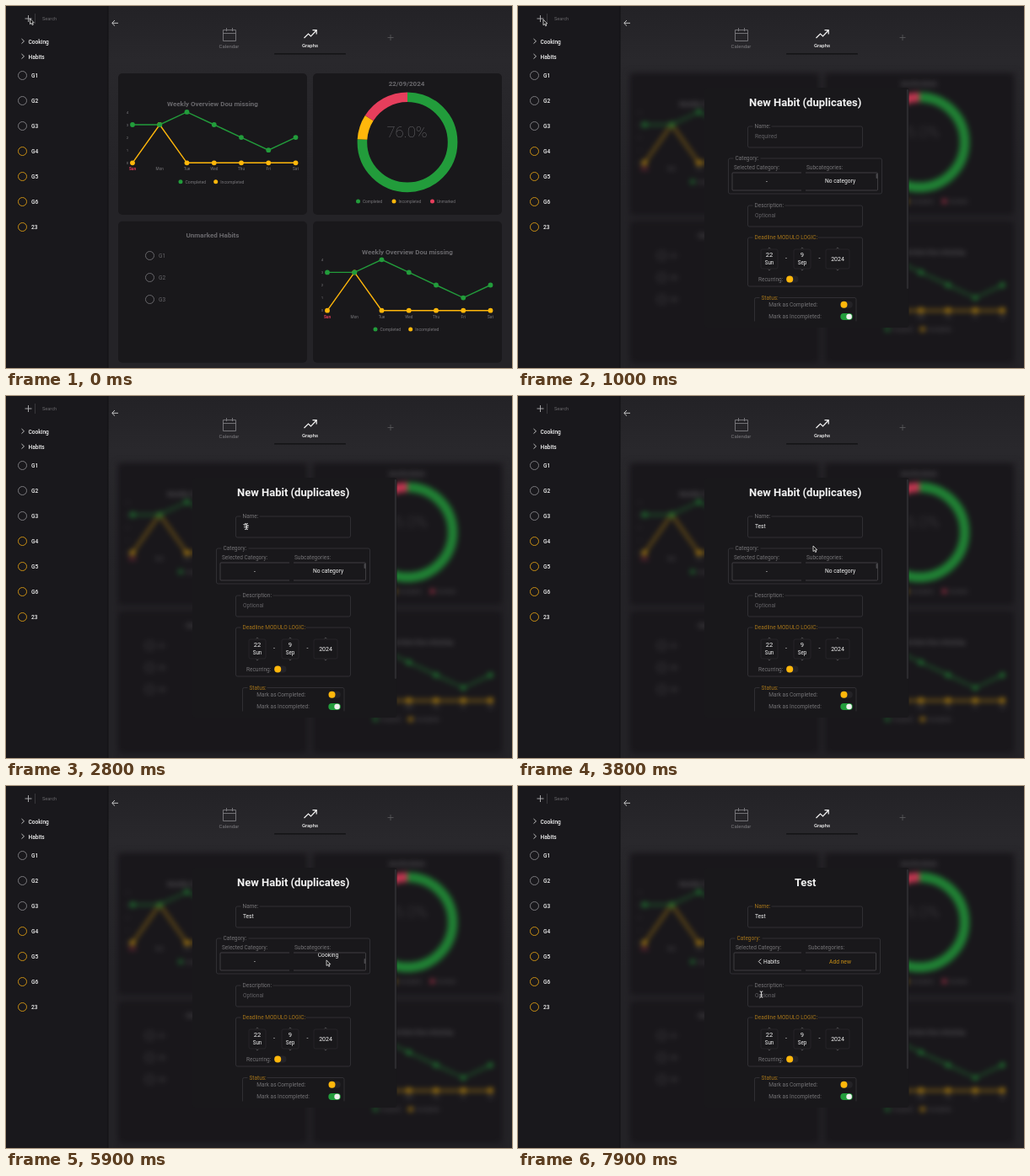
An HTML page for the animation above (8 s loop, 600 px wide and 430 px high).

```html
<!DOCTYPE html>
<html lang="en">
<head>
<meta charset="utf-8">
<title>Habit tracker</title>
<style>
html, body { margin: 0; width: 100%; height: 100%; overflow: hidden; background: #242327; }
svg { display: block; width: 600px; height: 430px; font-family: Roboto, "Open Sans", sans-serif; }
</style>
</head>
<body>
<svg id="stage" viewBox="0 0 600 430" xmlns="http://www.w3.org/2000/svg"></svg>
<script>
const LOOP = 8000;
const GREEN = '#229c3b', YELLOW = '#ffb70b', RED = '#e63e5c';
const PANEL = '#19181b', GOLD = '#a5741a', GREY = '#747376', LINE = '#343337', WHITE = '#f2f2f2';

const text = (x, y, s, size, fill, extra = '') =>
  `<text x="${x}" y="${y}" font-size="${size}" fill="${fill}" ${extra}>${s}</text>`;
const mid = (x, y, s, size, fill, extra = '') => text(x, y, s, size, fill, 'text-anchor="middle" ' + extra);
const rect = (x, y, w, h, fill, extra = '') =>
  `<rect x="${x}" y="${y}" width="${w}" height="${h}" fill="${fill}" ${extra}/>`;
const path = (d, stroke, width = 1, extra = '') =>
  `<path d="${d}" fill="none" stroke="${stroke}" stroke-width="${width}" ${extra}/>`;
const dot = (x, y, r, fill, extra = '') => `<circle cx="${x}" cy="${y}" r="${r}" fill="${fill}" ${extra}/>`;
const BOLD = 'font-weight="700"', MEDIUM = 'font-weight="500"';

function sidebar() {
  let s = rect(0, 0, 121, 430, '#19181c') + rect(120.5, 0, 1, 430, '#101012');
  s += path('M22.5 15H30.5M26.5 11V19', '#b4b4b6', .9);
  s += path('M34.5 9V21', '#38373b', 1) + text(43, 17.2, 'Search', 5.6, '#68676b');
  ['Cooking', 'Habits'].forEach((name, i) => {
    const y = 42 + i * 18;
    s += path(`M18.5 ${y - 3}l3 2.8l-3 2.8`, '#d0d0d0', .9) + text(26.5, y + 2.6, name, 6.6, WHITE, MEDIUM);
  });
  ['G1', 'G2', 'G3', 'G4', 'G5', 'G6', '23'].forEach((name, i) => {
    const y = 82.5 + i * 30;
    s += dot(19.5, y, 5, 'none', `stroke="${i < 3 ? '#7b7a7e' : '#c98f14'}" stroke-width="1"`);
    s += text(30, y + 2, name, 6.6, WHITE, MEDIUM);
  });
  return s;
}

function header() {
  return path('M133 20.3H126M129 17l-3.3 3.3l3.3 3.3', '#d5d5d5', .9) +
    path('M257.5 28.5h15v13h-15zM257.5 32.5h15M261.5 26v4M268.5 26v4', '#7c7b7f', .9) +
    mid(264.5, 49.8, 'Calendar', 6, '#7c7b7f') +
    path('M353.5 38l5-5l3 3l6.5-7M363.5 28.7h4.7v4.7', WHITE, 1.2) +
    mid(360.5, 48.8, 'Graphs', 6, WHITE, MEDIUM) +
    rect(318, 56.3, 85, 1.2, '#0f0f11', 'rx=".6"') +
    path('M452.5 37.5h7M456 34v7', '#5c5b5f', .8);
}

const legend = (x, y, name, fill, size) =>
  dot(x, y, 2.5, fill) + text(x + 5.5, y + 1.8, name, size, '#77767a');

function chart(dx, dy) {
  const px = i => 150 + i * 32.25, py = v => 186.3 - v * 15.1;
  const series = (values, fill) =>
    path('M' + values.map((v, i) => px(i) + ' ' + py(v)).join('L'), fill, 1.4) +
    values.map((v, i) => dot(px(i), py(v), 2.9, fill)).join('');
  let s = mid(245, 119.3, 'Weekly Overview Dou missing', 8, '#69686c', BOLD);
  for (let v = 0; v < 5; v++) s += mid(144, py(v) + 1.6, v, 4.4, '#77767a');
  ['Sun', 'Mon', 'Tue', 'Wed', 'Thu', 'Fri', 'Sat'].forEach((day, i) => {
    s += mid(px(i), 195.3, day, 4.7, i ? '#77767a' : RED, i ? '' : BOLD);
  });
  s += series([0, 3, 0, 0, 0, 0, 0], YELLOW) + series([3, 3, 4, 3, 2, 1, 2], GREEN);
  s += legend(207, 208.7, 'Completed', GREEN, 5.1) + legend(248.7, 208.7, 'Incompleted', YELLOW, 5.1);
  return `<g transform="translate(${dx} ${dy})">${s}</g>`;
}

function donut() {
  const arc = (from, share, fill) =>
    dot(476, 161.8, 53.6, 'none', `stroke="${fill}" stroke-width="11.6" pathLength="100"
      stroke-dasharray="${share} ${100 - share}" stroke-dashoffset="${-from}" transform="rotate(-90 476 161.8)"`);
  return mid(475, 95.3, '22/09/2024', 8, '#69686c', BOLD) +
    arc(0, 76, GREEN) + arc(76, 8, YELLOW) + arc(84, 16, RED) +
    mid(475.5, 156, '76.0%', 18.5, '#69686c', 'font-weight="100"') +
    legend(417.5, 232, 'Completed', GREEN, 4.8) + legend(460, 232, 'Incompleted', YELLOW, 4.8) +
    legend(505.5, 232, 'Unmarked', RED, 4.8);
}

function board() {
  let s = '';
  for (const x of [133, 364]) for (const y of [80, 255.7]) s += rect(x, y, 224, 168, PANEL, 'rx="5"');
  s += chart(0, 0) + donut() + chart(231, 175.4);
  s += mid(245, 275, 'Unmarked Habits', 8.1, '#69686c', BOLD);
  for (let i = 0; i < 3; i++) {
    const y = 296.5 + i * 26;
    s += dot(170.5, y, 5, 'none', 'stroke="#68676b" stroke-width="1"') + text(181, y + 2.2, 'G' + (i + 1), 6.5, '#68676b');
  }
  return s;
}

// A bordered group whose label interrupts the top edge
function field(x, y, w, h, label, labelWidth, fill, id = '') {
  return rect(x, y, w, h, 'none', `rx="2" stroke="${LINE}" stroke-width=".9"`) +
    rect(x + 6, y - 2, labelWidth + 4, 4, PANEL) + text(x + 8, y + 2.2, label, 6.5, fill, id);
}

function category(x, w, fill, boxX, boxW) {
  const left = boxX + .5, right = boxX + boxW - .5, cut = 337;
  return field(x, 181, w, 42, 'Category:', 28, fill) +
    text(boxX + 2.5, 194, 'Selected Category:', 6.5, GREY) +
    text(boxX + 88.5, 194, 'Subcategories:', 6.5, GREY) +
    path(`M${cut - 1} 198H${left + 1}q-1 0 -1 1V218q0 1 1 1H${cut - 1}M${cut + 4} 198H${right - 1}q1 0 1 1V218q0 1 -1 1H${cut + 4}`, '#434246', .9);
}

function toggle(x, y, on) {
  return rect(x, y - 4, 14.5, 8, on ? GREEN : '#242327', 'rx="4"') +
    dot(on ? x + 10.3 : x + 4.2, y, on ? 3.3 : 4, on ? '#efefef' : YELLOW);
}

function spinner(x, w, top, bottom) {
  let s = rect(x - w / 2, 289, w, 23, 'none', 'rx="2" stroke="#29282c" stroke-width=".8"');
  s += path(`M${x - 1.3} 288.2l1.3 -1.3l1.3 1.3M${x - 1.3} 312.8l1.3 1.3l1.3 -1.3`, '#77767a', .6);
  return s + (bottom
    ? mid(x, 298.4, top, 7.6, WHITE) + mid(x, 306.7, bottom, 6.3, WHITE)
    : mid(x, 302.5, top, 7, WHITE));
}

function modal() {
  return rect(221, 97, 242.5, 285, PANEL, 'rx="3"') +
    rect(460.8, 99, 2.2, 237, '#2c2b2f', 'rx="1"') +
    mid(340.7, 118.6, '', 13, WHITE, BOLD + ' id="title"') +
    `<g clip-path="url(#body)">` +
    field(272.5, 143, 136, 25, 'Name:', 18, GREY, 'id="nameLabel"') +
    text(281, 157.3, '', 6.6, WHITE, 'id="name"') +
    `<g id="choosing">${category(249.5, 182, GREY, 253.5, 173.5)}` +
    mid(295, 210.5, '-', 6.6, WHITE) +
    `<g clip-path="url(#list)"><g id="options">` +
    ['No category', 'Cooking', 'Habits'].map((s, i) => mid(382, 210.3 + i * 21, s, 6.7, WHITE)).join('') +
    `</g></g>${rect(424.6, 199, 1.8, 6, '#4a494d', 'rx=".9" id="thumb"')}</g>` +
    `<g id="chosen">${category(251.5, 178, GOLD, 255.5, 169.5)}` +
    path('M288.3 205.5l-3 3l3 3', WHITE, .9) + text(291, 210.7, 'Habits', 6.6, WHITE) +
    mid(382, 210.5, 'Add new', 6.7, '#c98f14') + '</g>' +
    field(272.5, 237, 136, 25, 'Description:', 34, GREY) + text(281, 251.2, 'Optional', 6.6, '#626165') +
    field(272.5, 275, 136, 58, 'Deadline MODULO LOGIC:', 73, GOLD) +
    spinner(298, 20, '22', 'Sun') + spinner(337, 20, '9', 'Sep') + spinner(379, 28, '2024') +
    mid(318, 302.4, '-', 7, WHITE) + mid(357.5, 302.4, '-', 7, WHITE) +
    text(285, 326.7, 'Recurring:', 6.5, GREY) + toggle(318, 324.5, false) +
    field(280.5, 346.5, 120.5, 50, 'Status:', 19, GOLD) +
    text(297.3, 357, 'Mark as Completed:', 6.5, GREY) + toggle(382.3, 354.7, false) +
    text(297.3, 371.2, 'Mark as Incompleted:', 6.5, GREY) + toggle(382.3, 369, true) +
    '</g>';
}

document.getElementById('stage').innerHTML = `
  <defs>
    <linearGradient id="page" x2="0" y2="1">
      <stop offset="0" stop-color="#232226"/><stop offset=".15" stop-color="#29282c"/><stop offset=".5" stop-color="#242327"/>
    </linearGradient>
    <clipPath id="body"><rect x="221" y="122" width="240" height="252.5"/></clipPath>
    <clipPath id="list"><rect x="341" y="198.5" width="83" height="20"/></clipPath>
  </defs>
  ${rect(121, 0, 479, 430, 'url(#page)')}
  ${header()}
  <g id="board">${board()}${rect(130, 77, 462, 356, PANEL, 'id="dim"')}</g>
  ${sidebar()}
  <g id="modal">${modal()}</g>
  <g id="arrow">${path('M0 0V6.6L1.6 5.2L2.7 7.6L3.8 7.1L2.7 4.8H4.7Z', '#e8e8e8', .8, 'style="fill:#111"')}</g>
  <g id="beam">${path('M-1.8 -3.6Q0 -3.6 0 -2.4Q0 -3.6 1.8 -3.6M0 -2.6V2.6M-1.8 3.6Q0 3.6 0 2.4Q0 3.6 1.8 3.6M-1.2 .8H1.2', '#dedede', 1)}</g>`;

const el = {};
document.querySelectorAll('[id]').forEach(n => el[n.id] = n);

const clamp = v => Math.max(0, Math.min(1, v));
const span = (t, a, b) => clamp((t - a) / (b - a));
const smooth = p => p * p * (3 - 2 * p);
const show = (node, on) => node.setAttribute('display', on ? 'inline' : 'none');
const put = (node, x, y) => node.setAttribute('transform', `translate(${x} ${y})`);

// Pointer stops: time, x, y
const stops = [
  [0, 28.5, 15], [400, 27, 14.5], [950, 27, 14.5], [1750, 285, 155], [3400, 285, 155],
  [3800, 350, 178], [4400, 377.5, 207], [5600, 377.5, 207], [6400, 385.5, 206.5],
  [7200, 385.5, 206.5], [7800, 288.5, 247.5], [LOOP, 288.5, 247.5]
];

function pointer(t) {
  const i = stops.findIndex((s, k) => k > 0 && t <= s[0]);
  const a = stops[i - 1], b = stops[i], p = smooth(span(t, a[0], b[0]));
  return [a[1] + (b[1] - a[1]) * p, a[2] + (b[2] - a[2]) * p];
}

function draw(t) {
  const blur = smooth(span(t, 300, 650));
  el.board.style.filter = blur ? `blur(${(3 * blur).toFixed(2)}px)` : 'none';
  el.dim.setAttribute('opacity', .2 * blur);

  const enter = span(t, 400, 900);
  show(el.modal, enter > 0);
  put(el.modal, 0, 300 * (1 - enter));
  el.modal.setAttribute('opacity', Math.min(1, enter * 1.15));

  const typed = 'Test'.slice(0, t < 2600 ? 0 : Math.floor((t - 2600) / 200) + 1);
  el.name.textContent = typed || 'Required';
  el.name.setAttribute('fill', typed ? WHITE : '#626165');

  const picked = t >= 7000;
  el.title.textContent = picked ? typed : 'New Habit (duplicates)';
  el.nameLabel.setAttribute('fill', picked ? GOLD : GREY);
  show(el.choosing, !picked);
  show(el.chosen, picked);

  const scroll = 21 * smooth(span(t, 4600, 5400)) + 21.5 * smooth(span(t, 5600, 6400));
  put(el.options, 0, -scroll);
  put(el.thumb, 0, scroll * .22);

  const [x, y] = pointer(t);
  const overField = enter === 1 && x > 272 && x < 409 && (y > 143 && y < 168 || y > 237 && y < 262);
  show(el.arrow, !overField);
  show(el.beam, overField);
  put(el.arrow, x, y);
  put(el.beam, x, y);
}

const start = performance.now();
function tick() {
  draw((performance.now() - start) % LOOP);
  requestAnimationFrame(tick);
}
tick();
</script>
</body>
</html>
```
